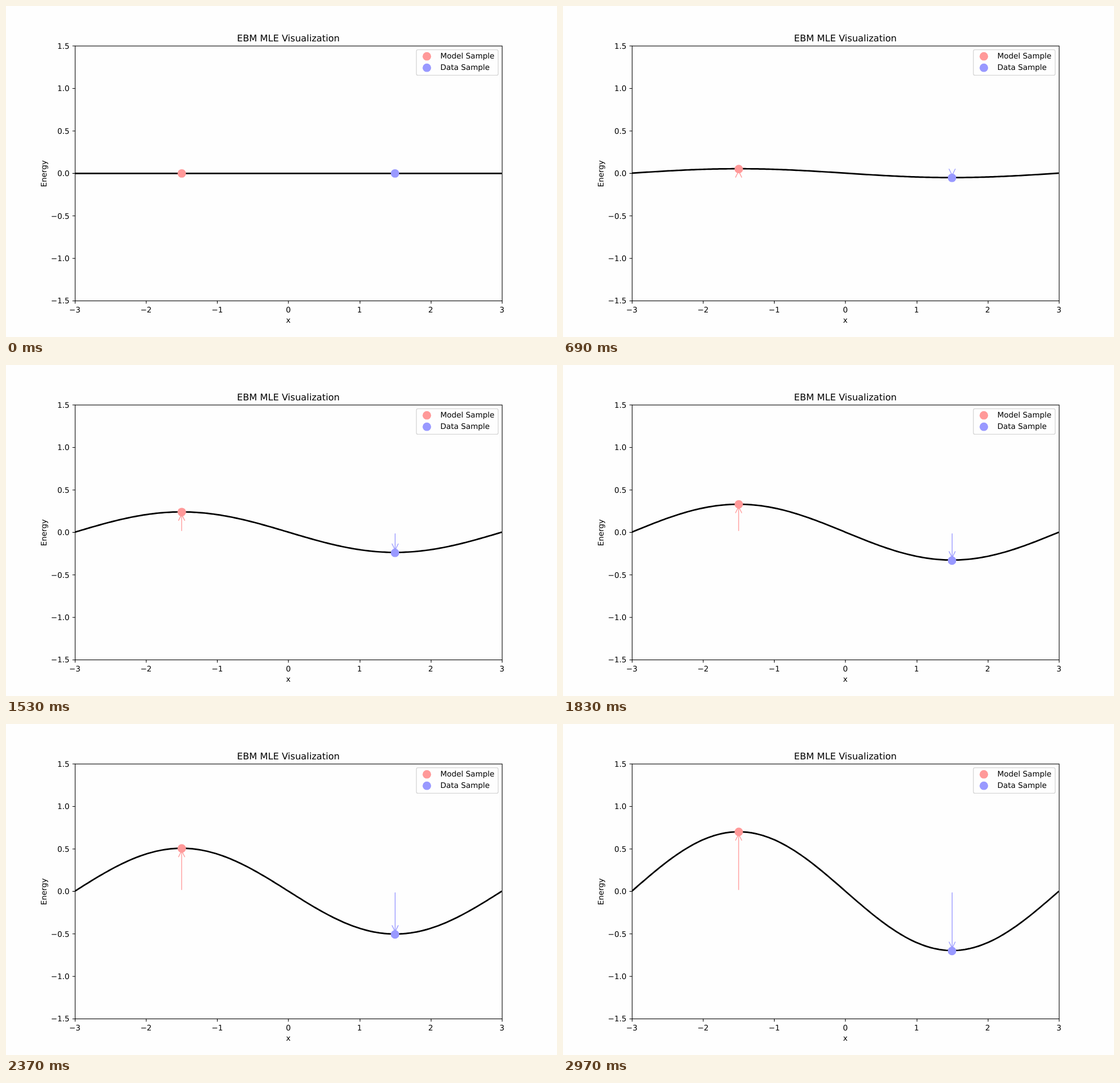
Animation, 966 px wide and 580 px high, one loop 3 s. Source, as an HTML page:

```html
<!DOCTYPE html>
<html lang="en">
<head>
<meta charset="utf-8">
<title>Energy curve</title>
<style>
  html, body { margin: 0; width: 100%; height: 100%; overflow: hidden; background: #fefefe; }
  svg { display: block; width: 966px; height: 580px; }
  text { font: 13.89px "DejaVu Sans", sans-serif; text-rendering: geometricPrecision; fill: #000; }
  .title { font-size: 16.67px; }
  .mid { text-anchor: middle; }
  .end { text-anchor: end; }
  .axis { fill: none; stroke: #000; stroke-width: 1.11; }
  .curve { fill: none; stroke: #000; stroke-width: 2.78; stroke-linejoin: round; }
  .arrow { fill: none; stroke-width: 1.39; stroke-linecap: round; stroke-linejoin: round; }
  .model { fill: #f99; }
  .data { fill: #99f; }
  .arrow.model { fill: none; stroke: #f99; }
  .arrow.data { fill: none; stroke: #99f; }
</style>
</head>
<body>
<svg viewBox="0 0 1000 600" preserveAspectRatio="none">
  <clipPath id="plot"><rect x="125" y="72" width="775" height="462"/></clipPath>
  <path id="curve" class="curve" clip-path="url(#plot)"/>
  <path id="modelArrow" class="arrow model"/>
  <path id="dataArrow" class="arrow data"/>
  <rect class="axis" x="125.5" y="72.5" width="775" height="462"/>
  <g id="ticks"></g>
  <circle id="modelDot" class="model" cx="319" r="7.7"/>
  <circle id="dataDot" class="data" cx="706" r="7.7"/>
  <text class="title mid" x="512.5" y="64">EBM MLE Visualization</text>
  <text class="mid" x="512.5" y="573.7">x</text>
  <text class="mid" transform="translate(73.3 303.8) rotate(-90)">Energy</text>
  <rect x="744.8" y="79.2" width="148.4" height="46.4" rx="2.8" fill="#fefefe" stroke="#d6d6d6" stroke-width="1.39"/>
  <circle class="model" cx="763.8" cy="91.2" r="7.7"/>
  <circle class="data" cx="763.8" cy="111.9" r="7.7"/>
  <text x="788.3" y="95.2">Model Sample</text>
  <text x="788.3" y="115.8">Data Sample</text>
</svg>
<script>
const FRAME_MS = 30, FRAMES = 100;
const ZERO_Y = 303, UNIT_X = 775 / 6, UNIT_Y = 154;
const SHRINK = 2.78, TIP_PAD = 1.55, HEAD = 11.11;

const $ = id => document.getElementById(id);
const px = x => 512.5 + x * UNIT_X;
const snap = v => Math.floor(v + 0.499) + 0.5;
const label = (v, digits) => (v < 0 ? "\u2212" : "") + Math.abs(v).toFixed(digits);

function drawTicks() {
  let out = "";
  for (let i = -3; i <= 3; i++) {
    const x = snap(px(i)), y = ZERO_Y - i * UNIT_Y / 2;
    out += `<path class="axis" d="M${x} 534.5v4.86M125.5 ${y + 0.5}h-4.86"/>`
      + `<text class="mid" x="${px(i)}" y="555">${label(i, 0)}</text>`
      + `<text class="end" x="115.3" y="${y + 5.4}">${label(i / 2, 1)}</text>`;
  }
  $("ticks").innerHTML = out;
}

function curvePath(amp) {
  const base = amp ? ZERO_Y : ZERO_Y + 0.5;
  let d = "";
  for (let i = 0; i <= 200; i++) {
    const x = -3 + i * 0.03;
    const y = base + amp * UNIT_Y * Math.sin(Math.PI * x / 3);
    d += `${i ? "L" : "M"}${px(x).toFixed(2)} ${y.toFixed(2)}`;
  }
  return d;
}

// dir is -1 for up, 1 for down; short arrows lose their end gaps
function arrowPath(x, len, dir) {
  if (!len) return "";
  const start = len > SHRINK ? SHRINK : 0;
  const end = len - (len > 2 * SHRINK ? SHRINK : 0);
  const at = v => ZERO_Y + dir * v;
  const tip = end - TIP_PAD, back = at(tip - HEAD), half = HEAD / 2;
  return `M${x} ${at(start)}V${at(end)}`
    + `M${x - half} ${back}L${x} ${at(tip)}L${x + half} ${back}`;
}

function drawSample(name, x, len, dir) {
  $(name + "Arrow").setAttribute("d", arrowPath(px(x), len, dir));
  $(name + "Dot").setAttribute("cy", snap(ZERO_Y + dir * len));
}

function draw(now) {
  const frame = Math.floor(now / FRAME_MS) % FRAMES;
  const amp = Math.sin(frame / FRAMES) ** 2;
  $("curve").setAttribute("d", curvePath(amp));
  drawSample("model", -1.5, amp * UNIT_Y, -1);
  drawSample("data", 1.5, amp * UNIT_Y, 1);
}

function loop() {
  draw(performance.now() - startTime);
  requestAnimationFrame(loop);
}

drawTicks();
const startTime = performance.now();
loop();
</script>
</body>
</html>
```
